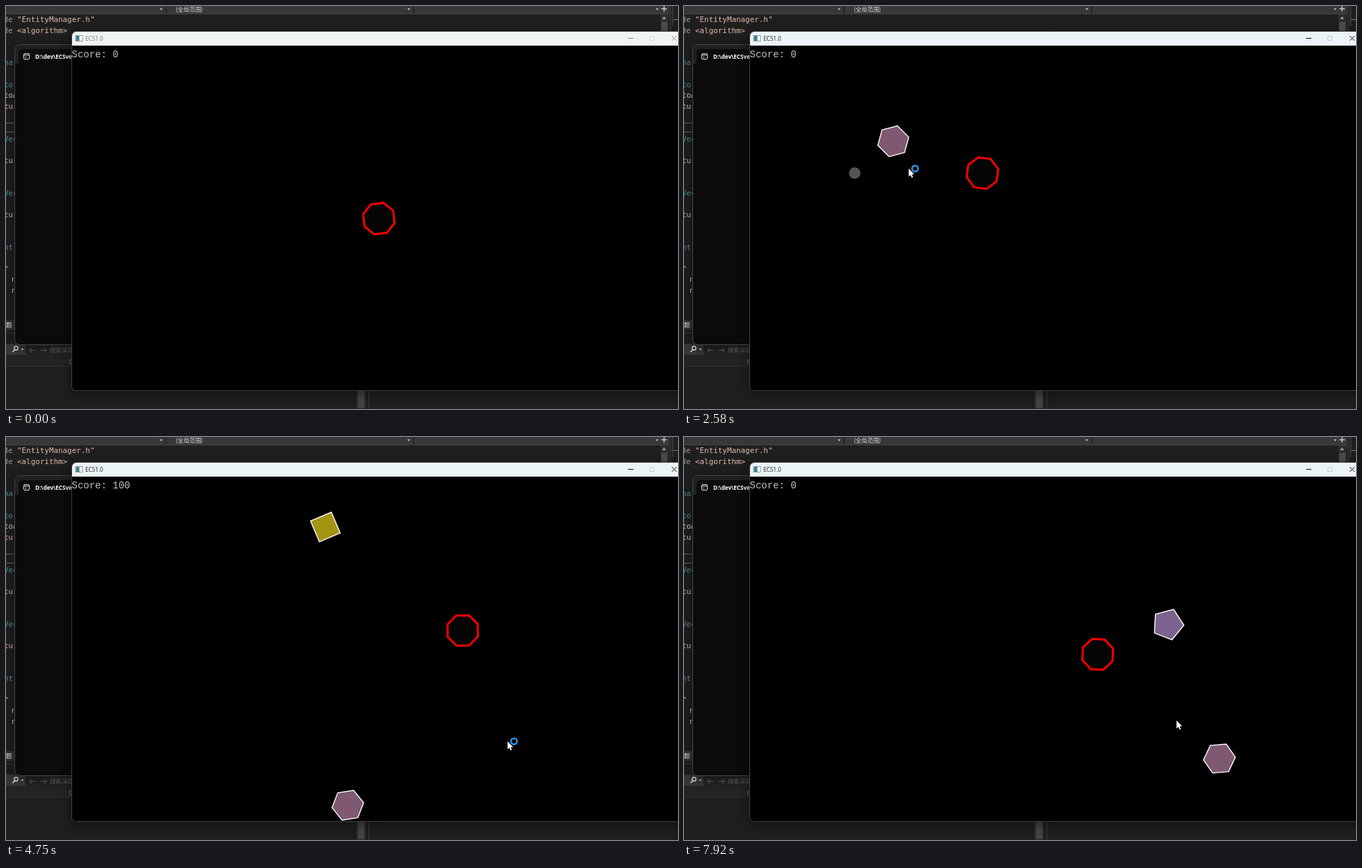
These frames come from a looping animation (966 by 580 pixels, 7.99 s). An HTML page with a canvas:

```html
<!DOCTYPE html>
<html lang="en">
<head>
<meta charset="utf-8">
<title>Shape shooter</title>
<style>
html, body { margin: 0; width: 100%; height: 100%; overflow: hidden; background: #1f1f1f; }
canvas { display: block; }
</style>
</head>
<body>
<canvas id="stage" width="966" height="580"></canvas>
<script>
const ctx = document.getElementById('stage').getContext('2d');
const LOOP = 7990;
const SPIN = 58;                      // degrees per second
const TOP = 79.5, BOTTOM = 532.5;     // where enemies bounce
const HOME = { x: 536, y: 306 };
const FIRST_KILL = 4420, SECOND_KILL = 5400, DEATH = 6050;
const UI = '"Open Sans", "Noto Sans", sans-serif';
const CJK = '"Noto Sans CJK SC", "Noto Sans CJK", sans-serif';

// Straight steps of the player: start and length in ms, destination.
const steps = [
  { at: 1700, ms: 575, x: 429, y: 240.5 },
  { at: 2820, ms: 560, x: 532.5, y: 319.5 },
  { at: 3800, ms: 670, x: 656.5, y: 278.5 },
  { at: 5660, ms: 335, x: 718.5, y: 332 },
  { at: DEATH, ms: 0, ...HOME },
  { at: 7600, ms: 380, x: 605.5, y: 314 }
];

// Resting points of the mouse, joined by eased moves.
const cursorStops = [
  { at: 250, x: 960, y: 575 }, { at: 1260, x: 499, y: 213 }, { at: 2580, x: 323, y: 234 },
  { at: 3420, x: 667, y: 376 }, { at: 4750, x: 721, y: 438 }, { at: 5920, x: 605, y: 262 },
  { at: 7000, x: 425, y: 250 }, { at: 7920, x: 708, y: 408 }
];

// Position and angle hold at time `at`; velocity is in pixels per second.
const enemies = [
  { sides: 6, fill: '#7f5971', from: 1320, to: LOOP, at: 3420, x: 374.5, y: 185, vx: 87.8, vy: 263, angle: 34 },
  { sides: 6, fill: '#e3506a', from: 2900, to: FIRST_KILL, at: 3420, x: 873.5, y: 491.5, vx: -140, vy: -70, angle: 3 },
  { sides: 4, fill: '#a39412', from: 4480, to: SECOND_KILL, at: 4750, x: 459, y: 129.5, vx: 80, vy: 90, angle: 22 },
  { sides: 5, fill: '#7d628f', from: 7640, to: LOOP, at: 7920, x: 695.5, y: 269.5, vx: 60, vy: 93, angle: 3 }
];
const bullets = [
  { at: 2166, to: 2786, x: 428, y: 240.5, vx: -440, vy: 0 },
  { at: 4040, to: FIRST_KILL, x: 577, y: 305, vx: 410, vy: 305 },
  { at: 5000, to: SECOND_KILL, x: 656, y: 278, vx: -365, vy: -225 }
];

const clamp01 = k => Math.max(0, Math.min(1, k));
const smooth = k => k * k * (3 - 2 * k);
const mix = (a, b, k) => ({ x: a.x + (b.x - a.x) * k, y: a.y + (b.y - a.y) * k });

function bounce(value, low, high) {
  const span = high - low;
  const phase = (((value - low) % (2 * span)) + 2 * span) % (2 * span);
  return low + span - Math.abs(span - phase);
}

function drift(body, t) {
  const s = (t - body.at) / 1000;
  return { x: body.x + body.vx * s, y: bounce(body.y + body.vy * s, TOP, BOTTOM) };
}

const playerAt = t => steps.reduce((pos, step) =>
  t < step.at ? pos : mix(pos, step, step.ms ? clamp01((t - step.at) / step.ms) : 1), HOME);

const cursorAt = t => cursorStops.reduce((pos, stop, i) => {
  const since = i ? cursorStops[i - 1].at : 0;
  return mix(pos, stop, smooth(clamp01((t - since) / (stop.at - since))));
}, cursorStops[0]);

function rect(x, y, w, h, color) {
  ctx.fillStyle = color;
  ctx.fillRect(x, y, w, h);
}

function text(str, x, y, color, font) {
  ctx.fillStyle = color;
  ctx.font = font;
  ctx.fillText(str, x, y);
}

function fill(color) {
  ctx.fillStyle = color;
  ctx.fill();
}

function stroke(color, width) {
  ctx.strokeStyle = color;
  ctx.lineWidth = width;
  ctx.stroke();
}

function path(points, closed) {
  ctx.beginPath();
  points.forEach(([x, y]) => ctx.lineTo(x, y));
  if (closed) ctx.closePath();
}

function line(color, width, ...points) {
  path(points);
  stroke(color, width);
}

function circle(x, y, radius) {
  ctx.beginPath();
  ctx.arc(x, y, radius, 0, 2 * Math.PI);
}

function panel(x, y, w, h, radius, color, border) {
  ctx.beginPath();
  ctx.roundRect(x, y, w, h, radius);
  fill(color);
  if (border) stroke(border, 1);
}

function shadowed(drawPanel) {
  ctx.save();
  ctx.shadowColor = 'rgba(0,0,0,.45)';
  ctx.shadowBlur = 16;
  ctx.shadowOffsetY = 4;
  drawPanel();
  ctx.restore();
}

function caret(x, y) {
  path([[x - 2, y - 1], [x + 2, y - 1], [x, y + 1.5]], true);
  fill('#d0d0d0');
}

function arrow(tip, tail, y) {
  const barb = tip + Math.sign(tail - tip) * 3;
  line('#666', 1, [tail, y], [tip, y]);
  line('#666', 1, [barb, y - 3.5], [tip, y], [barb, y + 3.5]);
}

function polygon({ x, y }, sides, radius, degrees) {
  path(Array.from({ length: sides }, (_, i) => {
    const a = degrees * Math.PI / 180 + i * 2 * Math.PI / sides;
    return [x + radius * Math.cos(a), y + radius * Math.sin(a)];
  }), true);
}

function drawCode() {
  const teal = '#449c8c', string = '#dfbba8', plain = '#d8d0c8';
  const colors = { har: teal, to: teal, Vec: teal, tur: string, 'nt:': '#5592a8' };
  const rows = ',,,,har,,to,toA,tur,,,Vec,,tur,,,Vec,,tur,,,nt:,,^ (,  n,  n'.split(',');
  const font = '10.9px "DejaVu Sans Mono", monospace';
  const baseline = row => 23 + row * 15.6;
  rows.forEach((str, row) => text(str, str[0] === ' ' ? -5 : -3, baseline(row), colors[str] || plain, font));
  ['"EntityManager.h"', '<algorithm>'].forEach((name, row) => {
    text('#include', -43, baseline(row), '#9b9b9b', font);
    text(name, 16, baseline(row), string, font);
  });
  rect(0, 168, 12, 1, '#666');
  rect(0, 181, 12, 1, '#666');
}

function drawEditor() {
  rect(0, 0, 966, 580, '#1f1f1f');

  // Navigation bar
  rect(0, 0, 954, 11, '#383838');
  rect(0, 11, 954, 1, '#464646');
  rect(229, 0, 2, 11, '#262626');
  rect(585, 0, 2, 11, '#262626');
  text('(全局范围)', 244, 7.5, '#e0e0e0', '8.4px ' + CJK);
  [223, 579, 936].forEach(x => caret(x, 4.5));
  line('#d0d0d0', 1.4, [942, 4], [950, 4]);
  line('#d0d0d0', 1.4, [946, 0], [946, 8]);

  // Scroll bar and side panel
  rect(941, 12, 11, 26, '#2e2e2e');
  path([[943, 19], [949, 19], [946, 15]], true);
  fill('#999');
  rect(942, 23, 9, 14, '#4d4d4d');
  rect(953, 0, 4, 37, '#2d2d2d');
  rect(958, 0, 1, 29, '#484848');
  rect(959, 19, 7, 1, '#777');

  drawCode();

  // Lower panels
  rect(0, 452, 12, 14, '#333');
  text('题', 0, 462, '#eee', '8.5px ' + CJK);
  rect(0, 470, 95, 1, '#393939');
  rect(0, 486, 95, 17, '#252525');
  rect(0, 486, 28, 16, '#383838');
  circle(14.5, 492.5, 2.7);
  stroke('#e0e0e0', 1.4);
  line('#e0e0e0', 1.6, [12.5, 494.5], [9.5, 498]);
  caret(23.5, 494);
  arrow(34, 42, 495.5);
  arrow(58, 50, 495.5);
  text('搜索深度', 63, 498, '#666', '8.4px ' + CJK);
  rect(0, 503, 95, 16, '#242424');
  text('仿', 90, 515, '#777', '8.4px ' + CJK);
  rect(0, 518, 95, 1, '#303030');
  rect(504, 554, 13, 26, '#2e2e2e');
  rect(506, 554, 9, 24, '#454545');
  rect(521, 554, 1, 26, '#3c3c3c');
}

function drawConsole() {
  shadowed(() => panel(12.5, 55.5, 110, 432, 7, '#0c0c0c', '#474747'));
  panel(13, 56, 110, 27, [7, 0, 0, 0], '#202020');
  panel(18, 62, 90, 23, [6, 0, 0, 0], '#0c0c0c');
  panel(25.5, 68.5, 8, 8, 1.5, '#0c0c0c', '#ddd');
  rect(26, 70, 7, 1, '#ddd');
  line('#ddd', 1, [27.5, 72], [29, 73.5], [27.5, 75]);
  text('D:\\dev\\ECSve', 42, 76, '#fff', 'bold 8.1px ' + UI);
}

function drawWindow(active, score) {
  shadowed(() => panel(94.5, 36.5, 890, 517, 6, '#000', '#404040'));
  panel(95, 37, 890, 20, [6, 0, 0, 0], active ? '#ecf4f8' : '#f0f4f4');
  const ink = active ? '#111' : '#8a8a8a';

  rect(99.5, 42, 11, 9, '#8b979c');
  rect(100.5, 43, 9, 7, '#fff');
  rect(100.5, 43, 5, 7, '#42808b');
  text('ECS1.0', 114, 49.5, active ? '#222' : '#777', '8.2px ' + UI);
  line(ink, 1, [894, 46.5], [902, 46.5]);
  ctx.strokeStyle = active ? '#c4cbcf' : '#dce0e0';
  ctx.strokeRect(925.5, 43.5, 6, 6);
  line(ink, 1, [957, 43], [964, 50]);
  line(ink, 1, [964, 43], [957, 50]);

  text('Score: ' + score, 94.5, 74, '#c0c0c0', '14px "Liberation Mono", monospace');
}

function drawCursor({ x, y }, busy) {
  path([[0, 0], [0, 11.5], [2.6, 9.2], [4.4, 13], [6.2, 12.2], [4.5, 8.5], [8, 8.2]]
    .map(([dx, dy]) => [x + dx, y + dy]), true);
  fill('#fff');
  if (!busy) return;
  circle(x + 9.2, y, 4.3);
  stroke('#2f97ee', 2.4);
}

function draw(t) {
  const turned = since => SPIN * (t - since) / 1000;
  const kills = t < DEATH ? (t >= FIRST_KILL) + (t >= SECOND_KILL) : 0;

  drawEditor();
  drawConsole();
  drawWindow(t >= 1000, kills * 100);

  for (const b of bullets.filter(b => t >= b.at && t < b.to)) {
    const { x, y } = drift(b, t);
    circle(x, y, 8.3);
    fill(`rgba(255,255,255,${1 - (t - b.at) / 620})`);
  }
  for (const e of enemies.filter(e => t >= e.from && t < e.to)) {
    polygon(drift(e, t), e.sides, 23, e.angle + turned(e.at));
    fill(e.fill);
    stroke('#fff', 1.4);
  }
  polygon(playerAt(t), 8, 23.5, 16 + turned(0));
  fill('#050505');
  stroke('#f80000', 3);

  if (t >= 250) drawCursor(cursorAt(t), t < 5500);
}

const start = performance.now();
function tick() {
  draw((performance.now() - start) % LOOP);
  requestAnimationFrame(tick);
}
tick();
</script>
</body>
</html>
```
